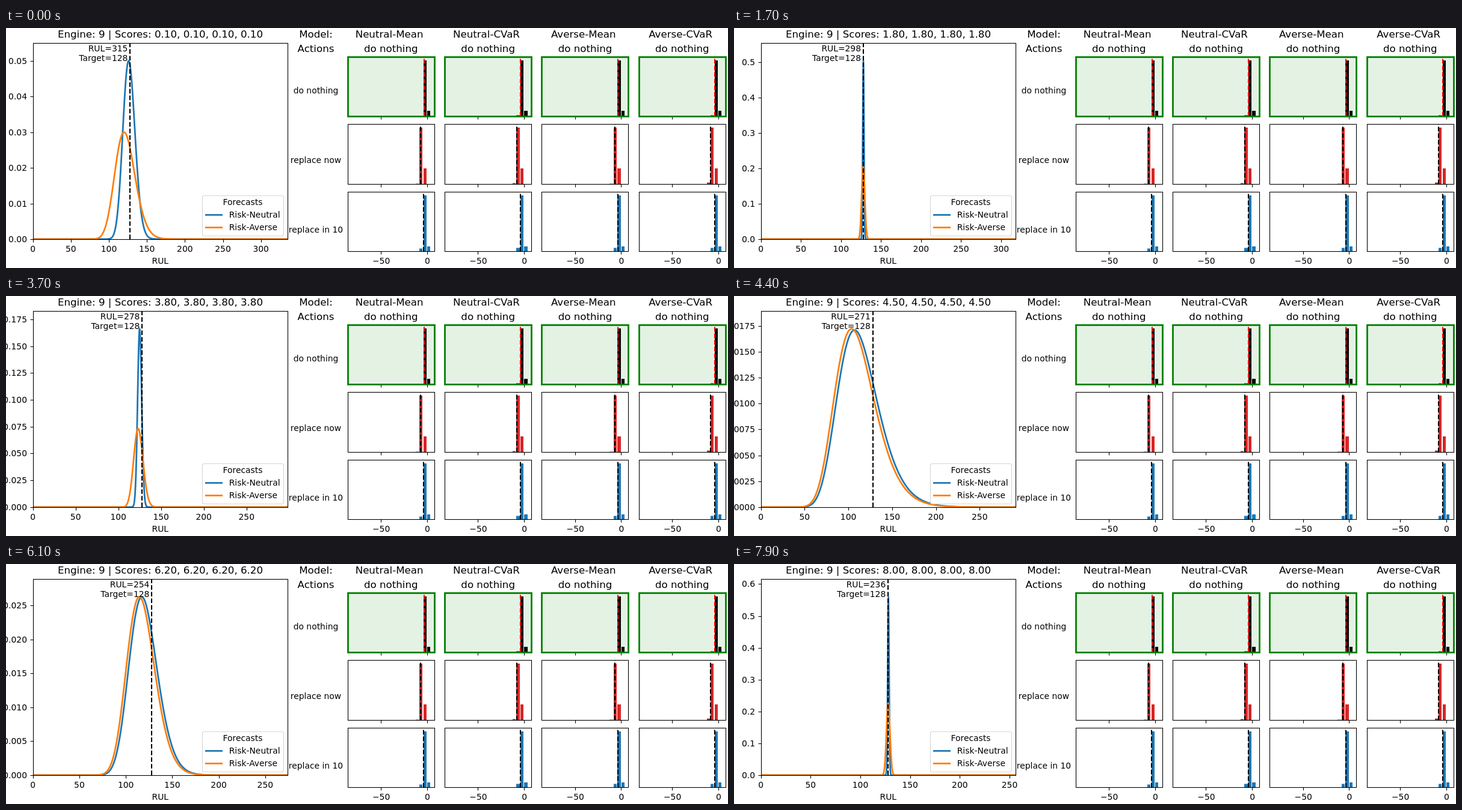
An HTML page with a canvas that plays this animation: 1200x400 px, repeating every 8000 ms.

```html
<!DOCTYPE html>
<html lang="en">
<head>
<meta charset="utf-8">
<title>Engine maintenance forecast</title>
<style>
html, body { margin: 0; width: 100%; height: 100%; overflow: hidden; background: #fff; }
canvas { display: block; }
</style>
</head>
<body>
<canvas id="stage" width="1200" height="400"></canvas>
<script>
const ctx = document.getElementById('stage').getContext('2d');
const STEP_MS = 100, STEPS = 80;
const BLUE = '#1f77b4', ORANGE = '#ff7f0e', RED = '#d62728';
const SMALL = 13.89, LARGE = 16.67;
const TARGET = 128;
const PLOT = { left: 44.65, right: 467.9, top: 25, bottom: 351.9 };

// step, neutral mode, neutral peak, averse mode, averse peak
const KEYS = [
  [0, 126, 0.05004, 120, 0.03],
  [10, 127.6, 0.23, 126.5, 0.1],
  [17, 128, 0.5037, 127.8, 0.207],
  [29, 128, 0.2895, 126.8, 0.1143],
  [36, 127.5, 0.23, 126, 0.09],
  [44, 107, 0.0171, 103.7, 0.01722],
  [61, 117.2, 0.0263, 114.6, 0.0263],
  [70, 124.6, 0.046, 122.5, 0.0423],
  [79, 128.2, 0.56, 128, 0.2247]
];

const MODELS = ['Neutral-Mean', 'Neutral-CVaR', 'Averse-Mean', 'Averse-CVaR'];
const ROWS = [
  { label: 'do nothing', y: 48, h: 99, color: '#000', dash: '#f00', first: -2,
    bars: [0, 93.5, 9.5], tails: [0, 2, 0, 2], marks: [-4.8, -6, -5.2, -5.8] },
  { label: 'replace now', y: 160, h: 100, color: RED, dash: '#000', first: -3,
    bars: [0, 94.5, 26.5], tails: [1, 2, 1, 3], marks: [-11, -12.2, -10.7, -12.6] },
  { label: 'replace in 10', y: 273, h: 99, color: BLUE, dash: '#000', first: -2,
    bars: [0, 93.5, 8.5], tails: [5, 6, 6, 6], marks: [-5.8, -6.2, -5.3, -5.8] }
];

// Thin rules sit on pixel centres.
const snap = v => Math.round(v) + 0.5;

function text(str, x, y, size = SMALL, align = 'center') {
  ctx.font = `${size}px "DejaVu Sans", sans-serif`;
  ctx.textAlign = align;
  ctx.fillStyle = '#000';
  ctx.fillText(str, x, Math.round(y));
}

function line(x1, y1, x2, y2, color = '#000', width = 1.1) {
  ctx.strokeStyle = color;
  ctx.lineWidth = width;
  ctx.beginPath();
  ctx.moveTo(x1, y1);
  ctx.lineTo(x2, y2);
  ctx.stroke();
}

function dashed(x, bottom, top, color) {
  const px = Math.round(x);
  ctx.setLineDash([7.7, 3.33]);
  line(px, bottom, px, top, color, 2.08);
  ctx.setLineDash([]);
}

function frameBox(x, y, w, h, color = '#000', width = 1.1) {
  ctx.strokeStyle = color;
  ctx.lineWidth = width;
  ctx.strokeRect(x, y, w, h);
}

// Peaks change geometrically, modes linearly.
function paramsAt(step) {
  const i = Math.max(1, KEYS.findIndex(k => k[0] >= step));
  const a = KEYS[i - 1], b = KEYS[i];
  const u = (step - a[0]) / (b[0] - a[0]);
  const mode = c => a[c] + (b[c] - a[c]) * u;
  const peak = c => a[c] * (b[c] / a[c]) ** u;
  return [
    { mode: mode(1), peak: peak(2), color: BLUE },
    { mode: mode(3), peak: peak(4), color: ORANGE }
  ];
}

// Log-normal density written in terms of its mode and peak height.
function density({ mode, peak }) {
  const raw = 1 / (mode * peak * Math.sqrt(2 * Math.PI));
  const s = raw * Math.exp(-raw * raw / 2);
  return x => x <= 0 ? 0 : peak * Math.exp(-(Math.log(x / mode) ** 2) / (2 * s * s));
}

function tickStep(range) {
  const raw = range / 9;
  const base = 10 ** Math.floor(Math.log10(raw));
  return [1, 2, 2.5, 5, 10].find(m => m * base >= raw) * base;
}

function drawForecast(step) {
  const { left, right, top, bottom } = PLOT;
  const rul = 315 - step;
  const curves = paramsAt(step);
  const xMax = rul + 20;
  const yMax = 1.1 * Math.max(...curves.map(c => c.peak));
  const px = x => left + x / xMax * (right - left);
  const py = y => bottom - y / yMax * (bottom - top);

  ctx.save();
  ctx.beginPath();
  ctx.rect(45, 25, 423, 328);
  ctx.clip();
  ctx.lineJoin = 'round';
  for (const curve of curves) {
    const f = density(curve);
    ctx.strokeStyle = curve.color;
    ctx.lineWidth = 2.78;
    ctx.beginPath();
    for (let x = 0; x <= xMax; x += 0.25) ctx.lineTo(px(x), py(f(x)));
    ctx.stroke();
  }
  dashed(px(TARGET), bottom, top, '#000');
  ctx.restore();

  for (let x = 0; x <= xMax; x += 50) {
    const tx = snap(px(x));
    line(tx, 352.5, tx, 357.5);
    text(x, px(x), 373);
  }
  const dy = tickStep(yMax);
  const digits = [1, 2, 3, 4, 5].find(d => Math.abs(dy * 10 ** d - Math.round(dy * 10 ** d)) < 1e-6);
  for (let i = 0; i * dy <= yMax; i++) {
    const y = py(i * dy);
    line(40.5, snap(y), 45.5, snap(y));
    text((i * dy).toFixed(digits), 35, y + 5, SMALL, 'right');
  }
  frameBox(45.5, 25.5, 423, 327);

  text('RUL=' + rul, px(TARGET) - 4, 39, SMALL, 'right');
  text('Target=' + TARGET, px(TARGET) - 4, 55, SMALL, 'right');
  text('RUL', 256.3, 393);
  const score = ((step + 1) / 10).toFixed(2);
  text('Engine: 9 | Scores: ' + Array(4).fill(score).join(', '), 256.5, 16, LARGE);
  drawLegend();
}

function drawLegend() {
  ctx.beginPath();
  ctx.roundRect(326.5, 279.5, 135, 67, 3);
  ctx.fillStyle = 'rgba(255,255,255,0.8)';
  ctx.fill();
  ctx.strokeStyle = '#d6d6d6';
  ctx.lineWidth = 1.2;
  ctx.stroke();
  text('Forecasts', 393.5, 295);
  [['Risk-Neutral', BLUE], ['Risk-Averse', ORANGE]].forEach(([name, color], i) => {
    const y = 311.5 + 21 * i;
    line(331, y, 360, y, color, 2.78);
    text(name, 370.7, y + 4.5, SMALL, 'left');
  });
}

function drawPanel(row, col) {
  const x = snap(568 + 161.2 * col);
  const y = row.y + 0.5, bottom = y + row.h;
  const zero = 699.8 + 161.33 * col;
  const chosen = row === ROWS[0];
  if (chosen) {
    ctx.fillStyle = '#e4f2e4';
    ctx.fillRect(x, y, 144, row.h);
  }
  ctx.fillStyle = row.color;
  row.bars.forEach((height, i) => {
    const h = i ? height : row.tails[col];
    const edge = zero + 0.3 + 6.5 * (row.first + i);
    const from = Math.round(edge);
    ctx.fillRect(from, bottom - h, Math.round(edge + 5.3) - from, h);
  });
  dashed(zero + row.marks[col], bottom, y, row.dash);
  for (const [value, tx] of [['\u221250', zero - 76.7], ['0', zero]]) {
    line(snap(tx), bottom, snap(tx), bottom + 5);
    if (row === ROWS[2]) text(value, tx + 0.5, 393);
  }
  frameBox(x, y, 144, row.h, chosen ? '#008000' : '#000', chosen ? 2.78 : 1.1);
}

function drawActions() {
  text('Model:', 515, 16, LARGE);
  text('Actions', 515, 40, LARGE);
  MODELS.forEach((name, col) => {
    const center = 639.8 + 161.33 * col;
    text(name, center - 2.7, 16, LARGE);
    text('do nothing', center, 40, LARGE);
    ROWS.forEach(row => drawPanel(row, col));
  });
  ROWS.forEach((row, i) => text(row.label, 515, 109 + 116 * i));
}

const start = performance.now();
function render() {
  const step = Math.floor(Math.max(0, performance.now() - start) / STEP_MS) % STEPS;
  ctx.fillStyle = '#fff';
  ctx.fillRect(0, 0, 1200, 400);
  drawForecast(step);
  drawActions();
  requestAnimationFrame(render);
}
render();
</script>
</body>
</html>
```
